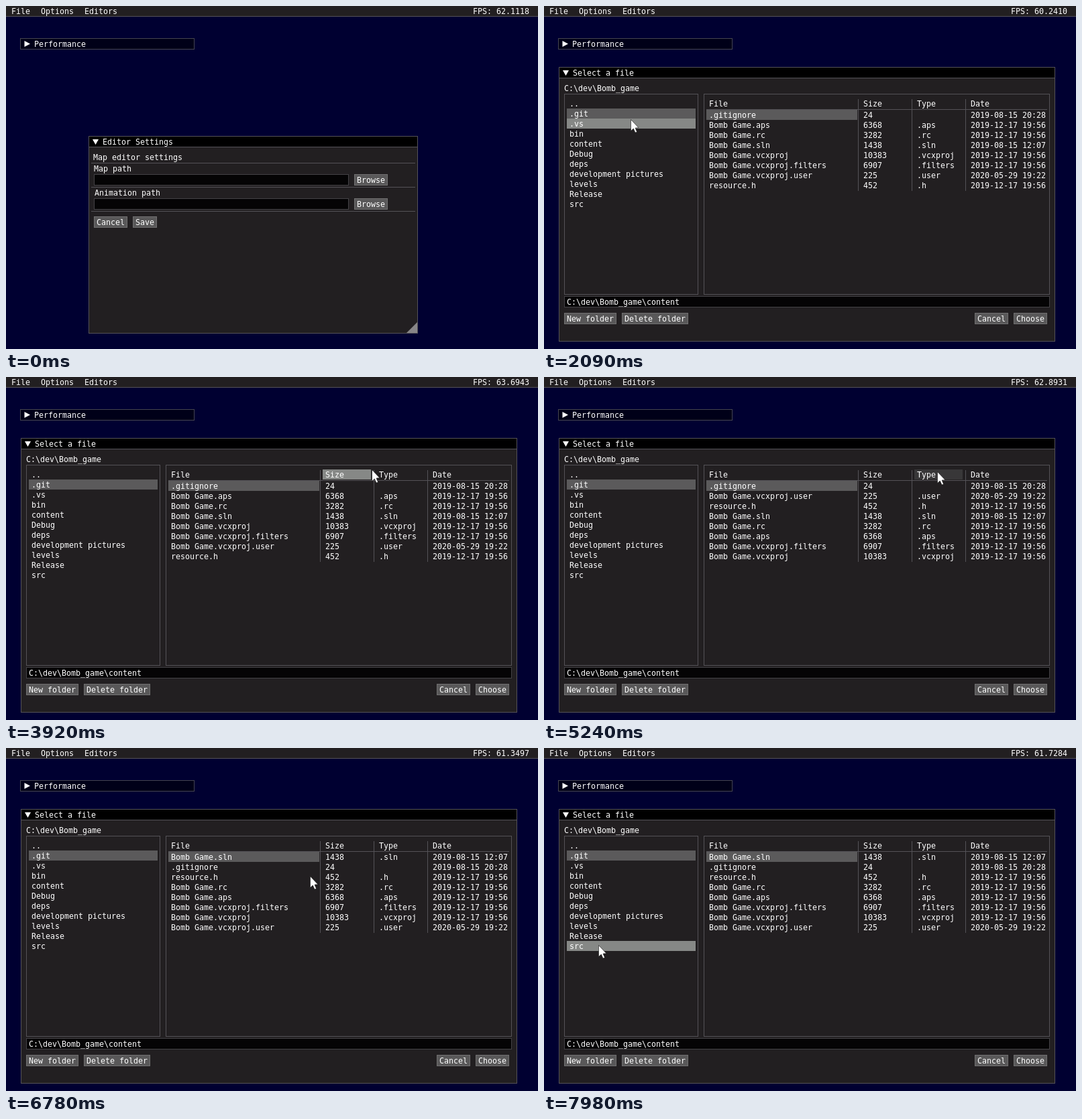
An HTML page with a canvas for the animation above (8000 ms loop, 793 by 512 pixels).

```html
<!DOCTYPE html>
<html lang="en">
<head>
<meta charset="utf-8">
<title>File dialog</title>
<style>
  html, body { margin: 0; width: 100%; height: 100%; overflow: hidden; background: #000031; }
  canvas { display: block; width: 793px; height: 512px; }
</style>
</head>
<body>
<canvas id="stage" width="793" height="512"></canvas>
<script>
const ctx = document.getElementById('stage').getContext('2d');
const LOOP = 8000, STEP = 20;
const LAG = 60;                                // the interface trails the pointer
const SETTLE = 50, HOLD = 110, REPEAT = 350;   // click rhythm at a stop
const SKY = '#000031', PANEL = '#221f21', BORDER = '#545257', BUTTON = '#595859';
const HOVER = '#868886', ACTIVE = '#383738', SELECTED = '#5b5a5b';

// Where the pointer rests or turns, and what it clicks there
const stops = [
  { from: 0, to: 0, x: 712, y: 535 },
  { from: 840, to: 1250, x: 545, y: 296, target: 'browse', clicks: 1 },
  { from: 1610, to: 1610, x: 236, y: 184 },
  { from: 2120, to: 2120, x: 120, y: 168 },
  { from: 2740, to: 3420, x: 359, y: 138, target: 'file', clicks: 2 },
  { from: 3920, to: 3920, x: 545, y: 138 },
  { from: 3950, to: 4960, x: 518, y: 140, target: 'size', clicks: 3 },
  { from: 5080, to: 5740, x: 586, y: 141, target: 'type', clicks: 2 },
  { from: 6010, to: 6580, x: 680, y: 143, target: 'date', clicks: 1 },
  { from: 6900, to: 6900, x: 316, y: 219 },
  { from: 7400, to: 7400, x: 110, y: 219 },
  { from: 7860, to: LOOP, x: 81, y: 294 }
];
const clicks = stops.flatMap(({ from, target, clicks = 0 }) =>
  Array.from({ length: clicks }, (_, i) => ({ target, down: from + SETTLE + i * REPEAT })));

const folders = ['..', '.git', '.vs', 'bin', 'content', 'Debug', 'deps',
  'development pictures', 'levels', 'Release', 'src'];
const checkout = '2019-12-17 19:56';
const files = [
  ['.gitignore', 24, '', '2019-08-15 20:28'],
  ['Bomb Game.aps', 6368, '.aps', checkout],
  ['Bomb Game.rc', 3282, '.rc', checkout],
  ['Bomb Game.sln', 1438, '.sln', '2019-08-15 12:07'],
  ['Bomb Game.vcxproj', 10383, '.vcxproj', checkout],
  ['Bomb Game.vcxproj.filters', 6907, '.filters', checkout],
  ['Bomb Game.vcxproj.user', 225, '.user', '2020-05-29 19:22'],
  ['resource.h', 452, '.h', checkout]
].map(([file, size, type, date]) => ({ file, size, type, date }));
const columns = [['File', 242, 222], ['Size', 472, 72], ['Type', 552, 72], ['Date', 632, 118]];

// Frame time wanders around 16.1 ms
function fps(t) {
  const noise = Math.sin(t) * 43758.5453 % 1;
  return (10000 / (161 + Math.round(noise * 6))).toFixed(4);
}

function pointer(t) {
  const i = stops.findIndex(s => t <= s.to), next = stops[i];
  if (t >= next.from) return next;
  const last = stops[i - 1], k = (t - last.to) / (next.from - last.to);
  return { x: last.x + (next.x - last.x) * k, y: last.y + (next.y - last.y) * k };
}

const isDown = t => clicks.some(c => t >= c.down && t < c.down + HOLD);

// A repeated click flips the order, a click on another column starts ascending
function stateAt(t) {
  const state = { open: false, key: 'file', dir: 1 };
  for (const { target, down } of clicks) {
    if (t < down + HOLD) break;
    if (target === 'browse') { state.open = true; continue; }
    state.dir = state.key === target ? -state.dir : 1;
    state.key = target;
  }
  return state;
}

function sortFiles({ key, dir }) {
  const compare = (a, b) => a[key] < b[key] ? -1 : a[key] > b[key] ? 1 : a.size - b.size;
  return [...files].sort((a, b) => dir * compare(a, b));
}

function rect(x, y, w, h, color) {
  ctx.fillStyle = color;
  ctx.fillRect(x, y, w, h);
}

function box(x, y, w, h, fill, line = BORDER) {
  rect(x, y, w, h, line);
  rect(x + 1, y + 1, w - 2, h - 2, fill);
}

// Text is placed by its left edge and the middle of its line
function text(value, x, middle) {
  ctx.fillStyle = '#fff';
  ctx.fillText(value, x, middle + 4);
}

function shape(points, color) {
  ctx.beginPath();
  points.forEach(([x, y]) => ctx.lineTo(x, y));
  ctx.closePath();
  ctx.fillStyle = color;
  ctx.fill();
}

function drawUI(t) {
  const past = Math.max(0, t - LAG);
  const mouse = pointer(past), state = stateAt(past);
  const hoverFill = isDown(past) ? ACTIVE : HOVER;
  const over = (x, y, w, h) =>
    mouse.x >= x && mouse.x < x + w && mouse.y >= y && mouse.y < y + h;

  function button(label, x, y) {
    const w = label.length * 7 + 8;
    box(x, y, w, 17, over(x, y, w, 17) ? hoverFill : BUTTON, '#717071');
    text(label, x + 4, y + 9);
  }

  function selectable(x, middle, w, selected) {
    const hovered = over(x, middle - 8, w, 15);
    if (hovered || selected) rect(x, middle - 8, w, 15, hovered ? hoverFill : SELECTED);
  }

  function panel(title, x, y, w, h) {
    box(x, y, w, h, PANEL);
    box(x, y, w, 17, '#000');
    shape([[x + 6, y + 5], [x + 15, y + 5], [x + 10.5, y + 13]], '#fff');
    text(title, x + 21, y + 9);
  }

  function settings() {
    panel('Editor Settings', 123, 194, 491, 295);
    text('Map editor settings', 130, 226);
    [234, 270, 306].forEach(y => rect(127, y, 483, 1, BORDER));
    ['Map path', 'Animation path'].forEach((label, i) => {
      const y = 251 + i * 36;
      text(label, 131 + i, y - 8);
      box(131, y, 380, 17, '#050405', '#444246');
      button('Browse', 519, y);
    });
    button('Cancel', 131, 314);
    button('Save', 189, 314);
    shape([[597, 488], [613, 488], [613, 472]], '#888688');
  }

  function dialog() {
    panel('Select a file', 22, 91, 740, 410);
    text('C:\\dev\\Bomb_game', 30, 123);
    box(30, 131, 200, 300, PANEL);
    box(238, 131, 516, 300, PANEL);

    folders.forEach((name, i) => {
      const y = 146 + i * 15;
      selectable(34, y, 192, name === '.git');
      text(name, 38, y);
    });

    columns.forEach(([label, x, w], i) => {
      selectable(x, 146, w, false);
      text(label, x + 4, 146);
      if (i) rect(x - 4, 139, 1, 137, BORDER);
    });
    rect(242, 154, 508, 1, BORDER);

    sortFiles(state).forEach((entry, i) => {
      const y = 163 + i * 15;
      selectable(242, y, 225, i === 0);
      columns.forEach(([label, x]) => text(entry[label.toLowerCase()], x + 4, y));
    });

    box(30, 433, 724, 17, '#050405', '#444246');
    text('C:\\dev\\Bomb_game\\content', 34, 442);
    button('New folder', 30, 458);
    button('Delete folder', 116, 458);
    button('Cancel', 642, 458);
    button('Choose', 700, 458);
  }

  rect(0, 0, 793, 512, SKY);
  rect(0, 0, 793, 15, PANEL);
  rect(0, 15, 793, 1, BORDER);
  text('File', 8, 8);
  text('Options', 52, 8);
  text('Editors', 117, 8);
  text('FPS: ' + fps(t), 696, 8);

  box(21, 48, 260, 17, '#000018', '#45454f');
  shape([[27.5, 52], [36, 56.5], [27.5, 61]], '#fff');
  text('Performance', 42, 57);

  state.open ? dialog() : settings();
}

function drawPointer(t) {
  const { x, y } = pointer(t);
  ctx.save();
  ctx.translate(Math.round(x), Math.round(y));
  if (isDown(t)) {
    ctx.beginPath();
    ctx.arc(0, 1, 12, 0, Math.PI * 2);
    ctx.fillStyle = 'rgba(230, 218, 8, 0.6)';
    ctx.fill();
  }
  shape([[0.5, 0.5], [0.5, 17.5], [4.3, 14], [7, 20], [9.6, 18.9], [7.1, 13], [12, 12.7]], '#fff');
  ctx.strokeStyle = '#111';
  ctx.lineWidth = 0.6;
  ctx.stroke();
  ctx.restore();
}

function frame() {
  const t = Math.floor(performance.now() % LOOP / STEP) * STEP;
  ctx.font = '11.63px "DejaVu Sans Mono", monospace';
  drawUI(t);
  drawPointer(t);
  requestAnimationFrame(frame);
}
frame();
</script>
</body>
</html>
```
